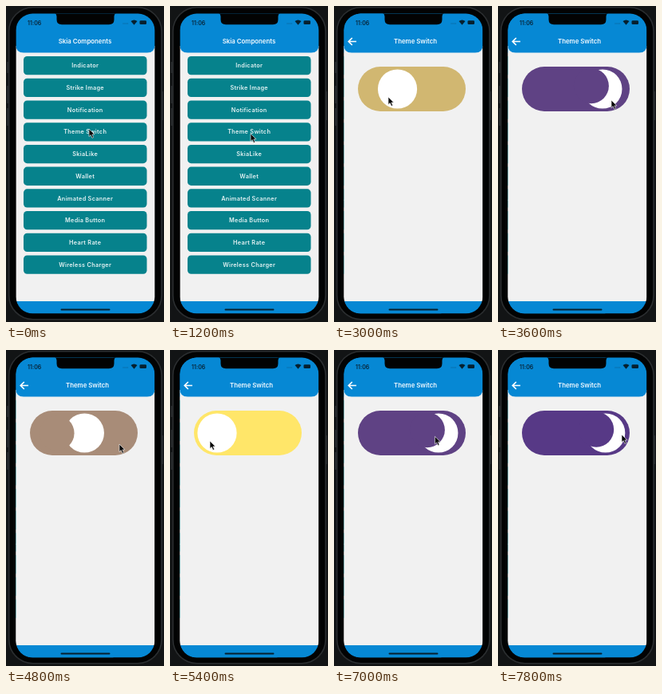
An HTML page that plays this animation: 198 px wide and 396 px high, repeating every 8 s.

```html
<!DOCTYPE html>
<html lang="en">
<head>
<meta charset="utf-8">
<title>Theme switch demo</title>
<style>
  html, body { margin: 0; width: 100%; height: 100%; overflow: hidden; background: #121415; }
  svg { display: block; width: 100%; height: 100%; }
  text { font-family: Inter, sans-serif; font-weight: 600; }
  .title { font-size: 7.84px; fill: #f4faff; text-anchor: middle; }
  .label { font-size: 7.3px; letter-spacing: .3px; fill: #e6f3f4; text-anchor: middle; }
</style>
</head>
<body>
<svg viewBox="0 0 198 396">
  <defs>
    <clipPath id="screen"><rect x="12.4" y="9.6" width="174" height="375.7" rx="21"/></clipPath>
    <g id="page">
      <rect x="12.4" y="50" width="174" height="320" fill="#f1f1f1"/>
      <path d="M12.4 9H186.4V49Q186.4 58.5 177 58.5H22Q12.4 58.5 12.4 49Z" fill="#0688d4"/>
      <rect x="12.4" y="370" width="174" height="16" fill="#0688d4"/>
    </g>
  </defs>

  <!-- Phone body -->
  <rect width="198" height="396" fill="#121415"/>
  <path d="M2 70V84M2 100V122M2 128V150M196 107V143" stroke="#25282a" stroke-width="2"/>
  <rect x="3.7" y="1.700" width="191.300" height="391" rx="30" fill="#020303" stroke="#2b2e30" stroke-width="1.600"/>

  <g clip-path="url(#screen)">
    <g id="list">
      <use href="#page"/>
      <text class="title" x="99" y="47.4">Skia Components</text>
    </g>
    <g id="detail">
      <use href="#page"/>
      <path d="M28 44.5H18.5M22.8 40L18.3 44.5L22.8 49" fill="none" stroke="#fff" stroke-width="1.7"/>
      <text class="title" x="102" y="47.4">Theme Switch</text>
      <rect id="track" x="30" y="76" width="135" height="56" rx="28"/>
      <circle id="knob" cy="104" r="24.6" fill="#fff"/>
      <circle id="bite" r="22"/>
    </g>

    <!-- Status bar, notch and home indicator -->
    <path d="M61 9H138Q135.500 10 135.500 13V17Q135.500 23.200 129 23.200H70Q63.500 23.200 63.500 17V13Q63.500 10 61 9Z" fill="#020303"/>
    <text x="27" y="23.500" font-size="7" fill="#08263a">11:06</text>
    <path d="M146.500 22H153" stroke="#0b5d91" stroke-width="1.200" stroke-dasharray="1 .8"/>
    <path d="M156.500 19Q160.500 15.800 164.500 19L160.500 23.800Z" fill="#06202f"/>
    <rect x="167.500" y="18.300" width="8.500" height="4.700" rx="1.300" fill="#06202f"/>
    <rect x="68.500" y="379.400" width="62" height="2" rx="1" fill="#06202f"/>
  </g>

  <path id="cursor" d="M0 0V9.600L2.200 7.600L3.900 11.400L5.600 10.600L4 6.900H7Z"
        fill="#080808" stroke="#fff" stroke-width=".6" stroke-linejoin="round"/>
</svg>
<script>
  const LOOP = 8000, STEP = 200;
  const DAY = [255, 230, 105], NIGHT = [84, 54, 134];
  const TAPS = [2760, 4360, 6160, 7785], TOGGLE_TIME = 900;
  const LABELS = ['Indicator', 'Strike Image', 'Notification', 'Theme Switch', 'SkiaLike',
    'Wallet', 'Animated Scanner', 'Media Button', 'Heart Rate', 'Wireless Charger'];
  // time, x, y of the pointer tip
  const POINTER = [
    [0, 104, 154], [1200, 101, 160], [1500, 101, 160], [2000, 72, 114], [2400, 68, 114],
    [3100, 68, 114], [3600, 142, 118], [4800, 142, 118], [5400, 50, 114],
    [6500, 50, 114], [7200, 157, 106], [7400, 155, 106], [8000, 155, 106]
  ];

  const $ = id => document.getElementById(id);
  const clamp = v => Math.min(1, Math.max(0, v));
  const mix = (a, b, p) => a + (b - a) * p;
  const place = (el, x, y) => el.setAttribute('transform', `translate(${x} ${y})`);

  $('list').insertAdjacentHTML('beforeend', LABELS.map((label, i) => {
    const y = 63 + i * 27.72;
    return `<rect x="22" y="${y}" width="154.5" height="23.3" rx="4.5" fill="#06828c"/>
      <text class="label" x="99.2" y="${y + 14.2}">${label}</text>`;
  }).join(''));

  function pointerAt(t) {
    const i = POINTER.findIndex(key => key[0] > t);
    const [t0, x0, y0] = POINTER[i - 1], [t1, x1, y1] = POINTER[i];
    const p = (t - t0) / (t1 - t0);
    return [mix(x0, x1, p), mix(y0, y1, p)];
  }

  // 0 = day, 1 = night; every tap runs linearly to the other side
  const nightAt = t => TAPS.reduce((sum, tap, i) =>
    sum + (i % 2 ? -1 : 1) * clamp((t - tap) / TOGGLE_TIME), 0);

  function draw(t) {
    const slide = 1 - (1 - clamp((t - 1380) / 500)) ** 3;
    place($('list'), -52 * slide, 0);
    place($('detail'), 174 * (1 - slide), 0);

    const night = nightAt(t);
    const color = `rgb(${DAY.map((c, i) => Math.round(mix(c, NIGHT[i], night)))})`;
    $('track').setAttribute('fill', color);
    $('knob').setAttribute('cx', mix(59, 136, night));
    $('bite').setAttribute('cx', mix(-1, 125.3, night));
    $('bite').setAttribute('cy', mix(109, 99.5, night));
    $('bite').setAttribute('fill', color);
    // The cut-out only shows once it overlaps the track
    $('bite').setAttribute('visibility', night > .3 ? 'inherit' : 'hidden');

    place($('cursor'), ...pointerAt(t));
  }

  const start = performance.now();
  function tick() {
    const t = (performance.now() - start) % LOOP;
    draw(Math.floor(t / STEP) * STEP);
    requestAnimationFrame(tick);
  }
  tick();
</script>
</body>
</html>
```
